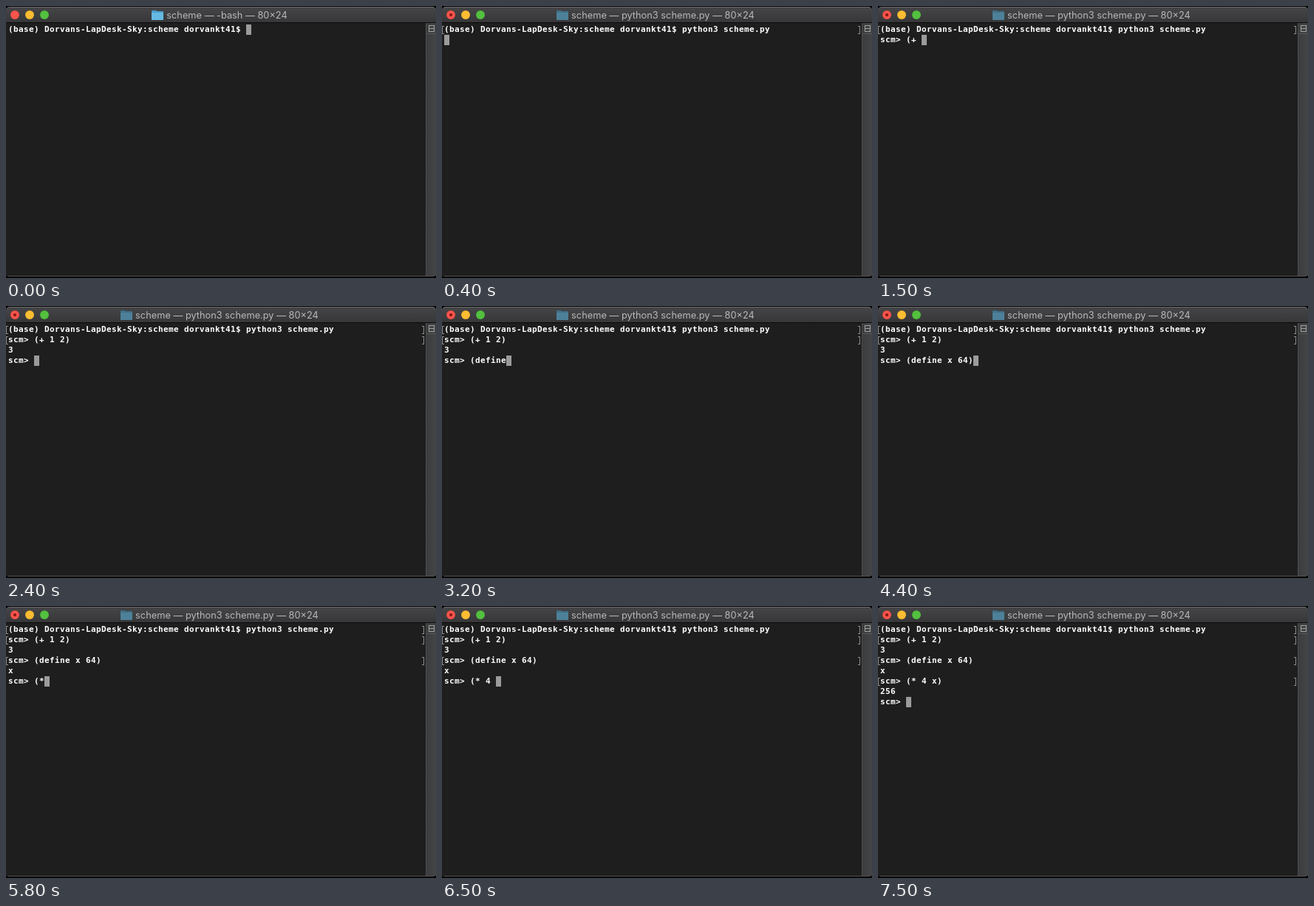
An HTML page with a canvas that plays this animation: 582 px wide and 368 px high, repeating every 8 s.

```html
<!DOCTYPE html>
<html lang="en">
<head>
<meta charset="utf-8">
<title>Terminal</title>
<style>
  html, body { margin: 0; width: 100%; height: 100%; overflow: hidden; background: #000; }
  #stage { position: relative; width: 582px; height: 368px; overflow: hidden; }
  canvas { position: absolute; left: 0; top: 0; }
  #title {
    position: absolute; top: 2px; height: 21px; white-space: pre;
    font: 400 12.8px/21px Inter, "Liberation Sans", sans-serif; color: #b8b8b9;
    left: 299px; transform: translateX(-50%);
  }
  #screen {
    position: absolute; left: 3px; top: 25px; margin: 0; color: #fff;
    font: 700 11px/14px "DejaVu Sans Mono", monospace;
    letter-spacing: .378px; font-variant-ligatures: none;
  }
</style>
</head>
<body>
<div id="stage">
  <canvas id="chrome" width="582" height="368"></canvas>
  <div id="title"></div>
  <pre id="screen"></pre>
</div>
<script>
const LOOP = 8000, COL = 7, ROW = 14, LEFT = 3, TOP = 25;
const PROMPT = '(base) Dorvans-LapDesk-Sky:scheme dorvankt41$ ';

// Time in ms and the characters that appear then
const output = [
  [0, PROMPT], [100, 'python3 scheme.py'], [200, '\n'], [500, 'scm> '],
  [1000, '('], [1300, '+'], [1500, ' '], [1600, '1'], [1700, ' '], [2000, '2'], [2200, ')'],
  [2400, '\n3\nscm> '],
  [2800, '('], [2900, 'd'], [3000, 'ef'], [3100, 'i'], [3200, 'ne'], [3300, ' '],
  [3700, 'x'], [3900, ' '], [4200, '64'], [4400, ')'],
  [4700, '\nx\nscm> '],
  [5200, '('], [5800, '*'], [5900, ' '], [6000, '4'], [6500, ' '], [6800, 'x'], [7000, ')'],
  [7500, '\n256\nscm> ']
];

// Rim and face of each window button
const buttons = [['#e0483f', '#fb544d'], ['#e0a52b', '#fdbd33'], ['#44ab36', '#53c03f']];

const ctx = document.getElementById('chrome').getContext('2d');
const title = document.getElementById('title');
const screen = document.getElementById('screen');

function rect(x, y, w, h, color) {
  ctx.fillStyle = color;
  ctx.fillRect(x, y, w, h);
}

function disc(x, y, r, color) {
  ctx.fillStyle = color;
  ctx.beginPath();
  ctx.arc(x, y, r, 0, Math.PI * 2);
  ctx.fill();
}

function box(x, y, w, h, r, color) {
  ctx.fillStyle = color;
  ctx.beginPath();
  ctx.roundRect(x, y, w, h, r);
  ctx.fill();
}

function gradient(x0, y0, x1, y1, from, to) {
  const g = ctx.createLinearGradient(x0, y0, x1, y1);
  g.addColorStop(0, from);
  g.addColorStop(1, to);
  return g;
}

function drawFolder(x, running) {
  const [back, front] = running ? ['#3f7088', '#4d8199'] : ['#4a9fcb', '#66b9e2'];
  box(x, 6, 7, 4, 1, back);
  box(x, 7, 16, 12, 1, back);
  box(x, 9, 16, 10, 1, front);
}

function drawScrollbar() {
  rect(568, 23, 14, 342, gradient(568, 0, 582, 0, '#3b3c3d', '#444546'));
  rect(568, 23, 1, 342, '#4c4c4d');
  rect(569, 37, 13, 1, '#555556');
  ctx.strokeStyle = '#a2a2a2';
  ctx.strokeRect(572.5, 26.5, 7, 8);
  rect(573, 30, 7, 1, '#a2a2a2');
}

function drawWindow(running) {
  rect(0, 0, 582, 368, '#000');
  box(0, 1, 582, 365, [5, 5, 4, 4], gradient(0, 1, 0, 366, '#6c6c6e', '#555557'));
  box(0, 2, 582, 363, [5, 5, 3, 3], gradient(0, 2, 0, 22, '#454547', '#373739'));
  rect(0, 22, 582, 1, '#0b0b0b');
  rect(0, 23, 582, 342, '#1e1e1e');
  drawScrollbar();

  buttons.forEach(([rim, face], i) => {
    disc(12 + 20 * i, 12, 6, rim);
    disc(12 + 20 * i, 12, 5.5, face);
  });
  if (running) disc(12, 12, 2, '#7d1410');
}

function drawBrackets(row) {
  const y = TOP + row * ROW + 2, color = '#8c8c8c';
  for (const [stem, tick] of [[0, 0], [565, 563]]) {
    rect(stem, y, 1, 11, color);
    rect(tick, y, 3, 1, color);
    rect(tick, y + 10, 3, 1, color);
  }
}

function setText(el, text) {
  if (el.textContent !== text) el.textContent = text;
}

function render(t) {
  const text = output.filter(([at]) => at <= t).map(([, s]) => s).join('');
  const lines = text.split('\n');
  const last = lines.length - 1;
  const running = t >= 300;

  setText(title, `scheme — ${running ? 'python3 scheme.py' : '-bash'} — 80×24`);
  setText(screen, text);

  drawWindow(running);
  drawFolder(running ? 155 : 197, running);
  lines.forEach((line, i) => {
    if (i < last && /^(scm>|\(base\))/.test(line)) drawBrackets(i);
  });
  rect(LEFT + lines[last].length * COL, TOP + last * ROW, COL, ROW, '#9b9b9b');
}

function tick() {
  render(performance.now() % LOOP);
  requestAnimationFrame(tick);
}
tick();
</script>
</body>
</html>
```
